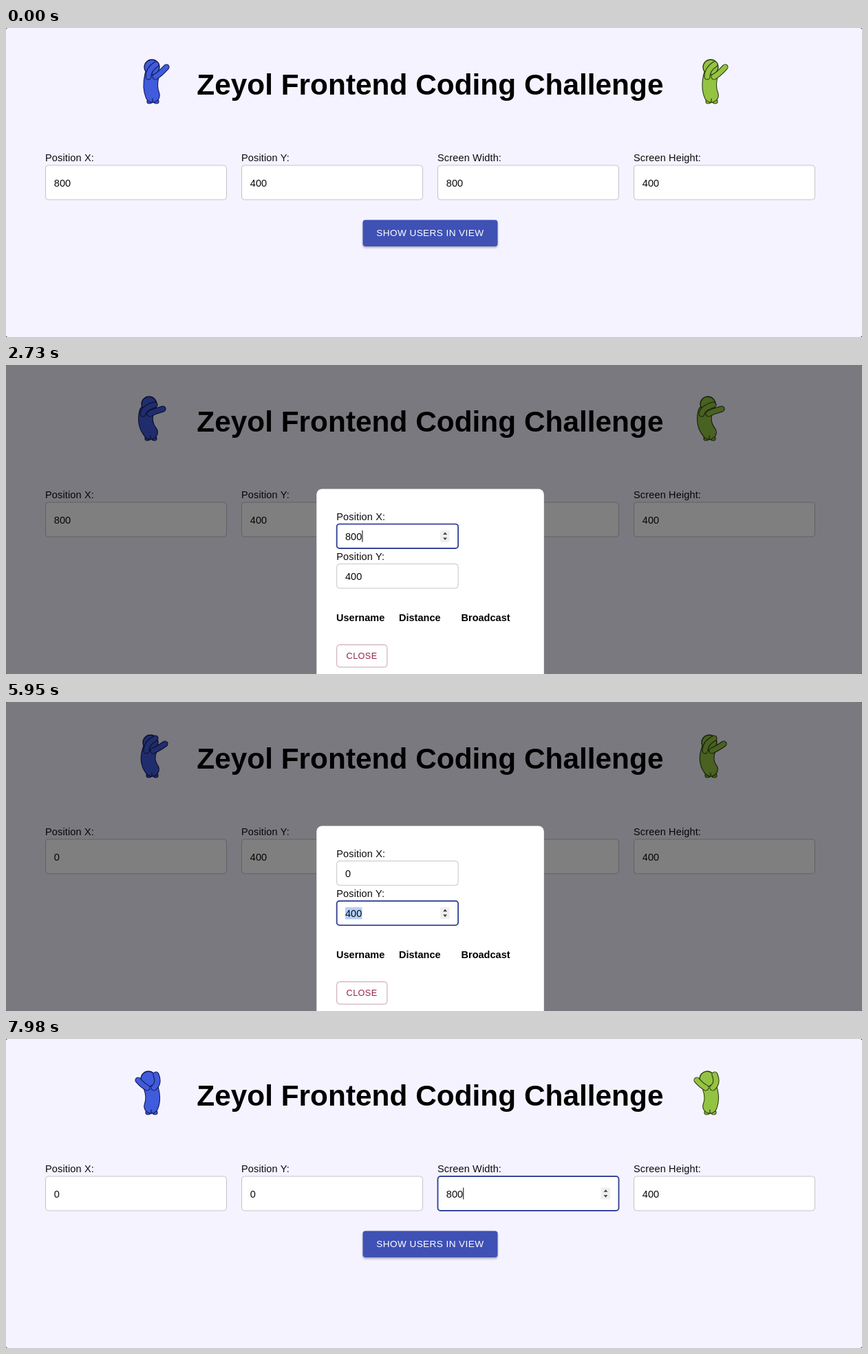
Animation of 1244 by 450 pixels, one loop 8 s. Source, as an HTML page:

```html
<!DOCTYPE html>
<html lang="en">
<head>
<meta charset="utf-8">
<title>Coding Challenge</title>
<style>
html, body { margin: 0; width: 100%; height: 100%; overflow: hidden; background: #3a3a3e; }
svg { display: block; }
text { font: 14.54px "Liberation Sans", Arial, sans-serif; fill: #0b0b0d; white-space: pre; }
.label { letter-spacing: .136px; }
.title { font-size: 42.4px; font-weight: bold; fill: #000; }
.head { font-weight: bold; fill: #000; }
.box { fill: #fff; stroke: #c4c3ca; stroke-width: 1; }
.box.hover { stroke: #212124; }
.box.focus { stroke: #37459a; stroke-width: 1.9; }
.show { font-size: 13.64px; letter-spacing: .39px; fill: #fff; }
.close { font-size: 12.73px; letter-spacing: .36px; fill: #94234b; }
#button { filter: drop-shadow(0 2px 1.5px rgba(0,0,0,.3)); }
#fig path, #fig circle { stroke-linecap: round; stroke-linejoin: round; fill: none; }
#fig .edge { stroke: var(--edge); }
#fig .skin { stroke: var(--skin); }
#fig circle { fill: var(--skin); stroke: var(--edge); stroke-width: 1.3; }
.blue { --skin: #405bdc; --edge: #141c52; }
.green { --skin: #94c342; --edge: #2b3d12; }
</style>
</head>
<body>
<svg width="1244" height="450" viewBox="0 0 1244 450">
  <defs><g id="fig"></g></defs>
  <rect width="1244" height="450" rx="3" fill="#f5f3ff"/>
  <use href="#fig" class="blue" x="187" y="44"/>
  <use href="#fig" class="green" x="999" y="44"/>
  <text class="title" x="955.5" y="96.5" text-anchor="end">Zeyol Frontend Coding Challenge</text>
  <g id="page"></g>
  <rect id="button" x="518.5" y="279.5" width="196" height="38.5" rx="4" fill="#3f51b5"/>
  <text class="show" x="538.3" y="303.4">SHOW USERS IN VIEW</text>
  <g id="modal">
    <rect width="1244" height="450" rx="3" fill="#000" opacity=".5"/>
    <g id="card">
      <rect x="451.3" y="180.5" width="330.5" height="330" rx="8" fill="#fff"/>
      <g id="inputs"></g>
      <text class="head" x="480" y="372.5">Username</text>
      <text class="head" x="571" y="372.5">Distance</text>
      <text class="head" x="661.5" y="372.5">Broadcast</text>
      <g id="row">
        <text x="494.5" y="410.5">peer4</text>
        <text x="580.3" y="410.5">0.00</text>
        <path fill="#757575" d="M671 402.3h3.7l4.6-4.6v14.6l-4.6-4.6H671zM681 401.4q2.3 1.2 2.3 3.6t-2.3 3.6z"/>
      </g>
      <g id="close">
        <rect id="closeBox" x="480.7" y="407.5" width="73.2" height="32.5" rx="4" fill="#fff" stroke="#caa0b0"/>
        <text class="close" x="494.6" y="428.4">CLOSE</text>
      </g>
    </g>
  </g>
</svg>
<script>
const LOOP = 8000, TICK = 70;
const $ = id => document.getElementById(id);

function add(parent, tag, attrs, text) {
  const el = document.createElementNS('http://www.w3.org/2000/svg', tag);
  for (const k in attrs) el.setAttribute(k, attrs[k]);
  if (text) el.textContent = text;
  parent.appendChild(el);
  return el;
}

const show = (el, on) => el.setAttribute('visibility', on ? 'inherit' : 'hidden');

// Number input: returns a setter for its value and state
function field(parent, label, x, y, w, h) {
  const mid = y + h / 2, sx = x + w - 26, tx = x + 12.3;
  add(parent, 'text', { class: 'label', x: x - .5, y: y - 6 }, label);
  const box = add(parent, 'rect', { x, y, width: w, height: h, rx: 4 });
  const mark = add(parent, 'rect', { x: tx, y: mid - 8.5, width: 24.5, height: 17.5, fill: '#b3d0fb' });
  const text = add(parent, 'text', { x: tx, y: mid + 5.6 });
  const spin = add(parent, 'g', {});
  add(spin, 'rect', { x: sx, y: mid - 8.5, width: 13.5, height: 17, fill: '#efefef' });
  add(spin, 'path', { fill: '#444', d: `M${sx + 4} ${mid - 2.2}h6l-3-3.6zM${sx + 4} ${mid + 2.2}h6l-3 3.6z` });
  const caret = add(parent, 'rect', { y: mid - 8.5, width: 1, height: 17, fill: '#000' });
  return (value, state = '', caretOn = false, selected = false) => {
    text.textContent = value;
    box.setAttribute('class', 'box ' + state);
    caret.setAttribute('x', tx + String(value).length * 8.09 + .2);
    show(spin, state);
    show(caret, caretOn);
    show(mark, selected);
  };
}

const pageField = (label, i) => field($('page'), label, 57.5 + 285 * i, 200, 263, 50);
const pageX = pageField('Position X:', 0), pageY = pageField('Position Y:', 1);
const pageW = pageField('Screen Width:', 2), pageH = pageField('Screen Height:', 3);
const cardX = field($('inputs'), 'Position X:', 480.7, 231.6, 176.4, 35.4);
const cardY = field($('inputs'), 'Position Y:', 480.7, 289.7, 176.4, 35.4);

// Dancer: head x,y; shoulder, waist, feet x; left elbow, hand; right elbow, hand
const POSES = [
  [25, 13, 25, 21, 26, 20, 16, 31, 9, 36, 24, 46, 13],
  [23, 15, 22, 16, 25, 17, 16, 30, 9, 34, 24, 44, 17],
  [21, 13, 17, 13, 23, 14, 18, 29, 14, 30, 23, 41, 20],
  [21, 12, 21, 21, 21, 4, 20, 9, 6, 42, 20, 37, 9],
  [20, 13, 22, 24, 22, 8, 24, 4, 12, 38, 20, 34, 7],
  [20, 14, 23, 29, 24, 12, 24, 5, 16, 36, 20, 31, 8],
  [22, 13, 24, 26, 24, 8, 22, 10, 10, 40, 20, 42, 8],
  [24, 13, 25, 23, 25, 14, 18, 24, 7, 38, 22, 47, 9]
];
// Ticks on which the dance does not advance
const HOLDS = [1, 2, 4, 7, 11, 14, 19, 23, 26, 29, 33, 36, 38, 42, 45, 48, 51, 54, 57, 60, 62,
  65, 70, 74, 76, 79, 81, 83, 86, 90, 93, 97, 100, 103, 106, 109, 111];

function limb(width) {
  const edge = add($('fig'), 'path', { class: 'edge', 'stroke-width': width + 2.2 });
  const skin = add($('fig'), 'path', { class: 'skin', 'stroke-width': width });
  return d => { edge.setAttribute('d', d); skin.setAttribute('d', d); };
}
const feet = limb(5), body = limb(19.5);
const legs = add($('fig'), 'path', { class: 'edge', 'stroke-width': 1.2 });
const head = add($('fig'), 'circle', { r: 11 });
const armL = limb(7), armR = limb(7);

function dance([hx, hy, sx, wx, fx, lex, ley, lhx, lhy, rex, rey, rhx, rhy]) {
  feet(`M${fx - 5} 63h1M${fx + 5} 63h1`);
  body(`M${sx} 25Q${wx} 42 ${fx} 54`);
  legs.setAttribute('d', `M${fx} 59V65`);
  head.setAttribute('cx', hx);
  head.setAttribute('cy', hy);
  armL(`M${sx - 5} 27Q${lex} ${ley} ${lhx} ${lhy}`);
  armR(`M${sx + 5} 27Q${rex} ${rey} ${rhx} ${rhy}`);
}

// Last value whose start tick has been reached
const at = (k, steps) => steps.filter(s => s[0] <= k).pop()[1];
const within = (k, ...spans) => spans.some(([a, b]) => k >= a && k < b);

function draw(t) {
  const k = Math.floor(t / TICK);
  dance(POSES[(k - HOLDS.filter(h => h <= k).length) % POSES.length]);

  const x = at(k, [[0, '800'], [48, '8000'], [57, '800'], [60, '80'], [62, '8'], [65, '0']]);
  const y = at(k, [[0, '400'], [88, '0']]);
  pageX(x);
  pageY(y);
  pageW('800', at(k, [[0, ''], [108, 'hover'], [111, 'focus']]), k >= 111);
  pageH('400');
  cardX(x, at(k, [[0, ''], [33, 'hover'], [37, 'focus'], [68, 'hover'], [79, '']]),
    within(k, [37, 45], [48, 56], [57, 68]));
  cardY(y, at(k, [[0, 'hover'], [33, ''], [68, 'focus']]),
    within(k, [88, 96]), within(k, [68, 88]));

  const open = within(k, [20, 103]), found = k >= 88;
  show($('modal'), open);
  show($('row'), found);
  $('card').setAttribute('transform', `translate(0 ${found ? -18 : 0})`);
  $('close').setAttribute('transform', `translate(0 ${found ? 36 : 0})`);
  $('closeBox').setAttribute('fill', k >= 97 ? '#fdf5f8' : '#fff');

  const p = k < 20 ? Math.min(1, Math.max(0, (k - 14) / 4)) : 0;
  $('button').setAttribute('fill', `rgb(${63 - 15 * p},${81 - 18 * p},${181 - 22 * p})`);
  $('button').style.filter = `drop-shadow(0 ${2 + p}px ${1.5 + p}px rgba(0,0,0,.3))`;
}

function frame() {
  draw(performance.now() % LOOP);
  requestAnimationFrame(frame);
}
frame();
</script>
</body>
</html>
```
